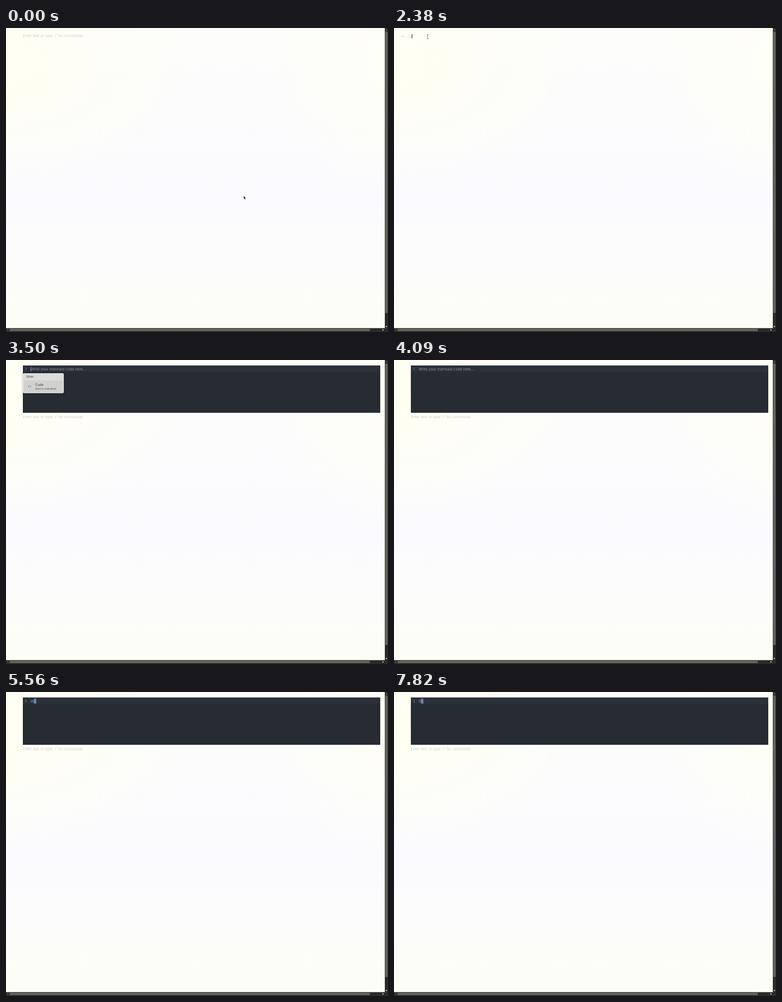
Recreate the animation shown at these times as an HTML page. Size 839 by 668 pixels, loop 8000 ms.

```html
<!DOCTYPE html>
<html lang="en">
<head>
<meta charset="utf-8">
<title>Editor</title>
<style>
html, body { margin: 0; width: 100%; height: 100%; overflow: hidden; }
body {
  position: relative;
  font: 8px Inter, sans-serif;
  background:
    radial-gradient(ellipse 420px 260px at 0 90px, #fffff2, #fffff200),
    radial-gradient(ellipse 260px 280px at 832px 90px, #fefff5, #fefff500),
    linear-gradient(#fdfdfb, #fcfcfd 25%, #fbfbff 56%, #fcfcfc 75%, #fdfdf6);
}
svg { position: absolute; left: 0; top: 0; }
#line {
  position: absolute; left: 54px; top: 13px;
  line-height: 14px; white-space: pre; color: #abb2bf;
}
.match { background: #bad0f847; padding: 1px 0; }
#bar {
  display: inline-block; width: 1px; height: 10px;
  margin: 0 -.5px; vertical-align: -2px; background: #7fa6f5;
}
</style>
</head>
<body>
<svg width="839" height="668">
  <g id="side" stroke="#c4c4c4" fill="#c4c4c4">
    <path d="M16 18.5h6M19 15.5v6" stroke-width=".7"/>
    <path d="M29.5 15.5h1m1.5 0h1m-3.5 3h1m1.5 0h1m-3.5 3h1m1.5 0h1"/>
  </g>
  <g id="block">
    <rect x="37" y="12" width="785" height="104" fill="#272c33"/>
    <rect x="37" y="12" width="785" height="14" fill="#2a3138"/>
    <text x="42" y="22.9" fill="#89909c">1</text>
  </g>
  <text id="hint" x="37" fill="#cfcfcf">Enter text or type '/' for commands</text>
  <text id="slash" x="37" y="21" fill="#3f3f3f">/</text>
  <rect id="caret" width="1" height="10" fill="#333"/>

  <g id="menu">
    <rect x="37" y="29" width="90" height="44" rx="3" fill="#fcfcf9"
      style="filter:drop-shadow(0 1px 3px #0004)"/>
    <rect x="39" y="45" width="86" height="27" rx="2" fill="#efefeb"/>
    <g fill="#555" font-weight="500">
      <text x="44.5" y="39.2" font-size="6">Other</text>
      <text x="64.5" y="56.5" font-size="7">Code</text>
      <text x="64.5" y="65.3" font-size="5">Insert a code block.</text>
    </g>
    <path d="M51 56l-2 2 2 2M53 56l2 2-2 2" fill="none" stroke="#555" stroke-width=".8"/>
  </g>

  <g fill="#2b2b2a">
    <path d="M832 0h7v668H0v-8.500h832z"/>
    <path d="M833 8h5v618h-5zM8 661h791v5H8z" fill="#66665f"/>
    <path d="M834 5l1.500-2.500 1.500 2.500zM5 662v3l-2.500-1.500z" fill="#888"/>
    <path d="M833.500 655h4l-2 2.500zM827 661.500v4l2.500-2z" fill="#eee"/>
  </g>
  <g id="size">
    <rect x="778" width="61" height="13" fill="#fdfdf9"/>
    <text x="782" y="9.3" font-size="6.8" font-family="Noto Sans, sans-serif" fill="#333">1675px × 1286px</text>
  </g>
  <path id="arrow" d="M0 0v7l1.600-1.500 1.200 2.700 1.300-.600-1.200-2.500h2.200z"
    fill="#000" stroke="#fff" stroke-width=".5"/>
  <path id="beam" d="M-2-4.500h1.500l.5.500.5-.5H2M0-4v8M-2 4.500h1.500l.5-.5.5.5H2"
    fill="none" stroke="#444" stroke-width=".8"/>
</svg>
<div id="line"></div>

<script>
const $ = id => document.getElementById(id);
const show = (id, on) => $(id).style.opacity = +on;
const ramp = (t, a, b) => Math.min(1, Math.max(0, (t - a) / (b - a)));
const ease = p => p * p * (3 - 2 * p);

// time, x, y of the mouse
const path = [[40, 522, 369], [820, 102, 58], [880, 102, 58], [1060, 94, 66], [1480, 74, 19]];
// time, typed code, colour of the word
const edits = [
  [3490, ""], [4670, "i", "#e06c75"], [4910, "id", "#e06c75"], [5560, "id()", "#61afef"],
  [5860, "id", "#e06c75"], [6170, "i", "#e06c75"], [6390, "if", "#c678dd"], [6590, "if()", "#c678dd"]
];

function mouseAt(t) {
  let [, x, y] = path[0];
  for (let i = 1; i < path.length; i++) {
    const [a, x0, y0] = path[i - 1], [b, x1, y1] = path[i];
    if (t < a) break;
    const p = ease(ramp(t, a, b));
    x = x0 + (x1 - x0) * p;
    y = y0 + (y1 - y0) * p;
  }
  return [x, y];
}

function codeAt(t) {
  const edit = edits.filter(e => e[0] <= t).pop();
  if (!edit) return "";
  const [start, text, color] = edit;
  const bar = (t - start) % 1200 < 600 ? '<i id="bar"></i>' : "";
  if (!text) return bar + '<span style="color:#8a9096">Write your mermaid code here...</span>';
  const word = `<span style="color:${color}">${text.replace("()", "")}</span>`;
  return text.endsWith("()")
    ? `${word}<span class="match">(</span>${bar}<span class="match">)</span>`
    : word + bar;
}

let lastCode = "";
function draw(t) {
  const coding = t >= 3470, typed = t >= 2380 && t < 3300, cleared = t >= 3300 && !coding;

  const [x, y] = mouseAt(t), overText = y < 27;
  for (const id of ["arrow", "beam"]) $(id).setAttribute("transform", `translate(${x} ${y})`);
  show("arrow", !overText);
  show("beam", overText && !coding);
  show("size", t >= 60 && t < 1080);
  show("side", t >= 1340 && t < 2430);

  show("hint", !typed);
  $("hint").setAttribute("y", coding ? 128 : cleared ? 24 : t < 40 ? 20.4 : 21);
  show("slash", typed);
  show("caret", t >= 1510 && t < 2010 || t >= 2380 && t < 2860 || cleared);
  $("caret").setAttribute("x", typed ? 39.5 : 37);
  $("caret").setAttribute("y", cleared ? 16 : 13);

  show("menu", ramp(t, 2420, 2700) * (1 - ramp(t, 3470, 3680)));
  show("block", coding);
  const code = codeAt(t);
  if (code !== lastCode) $("line").innerHTML = lastCode = code;
}

function tick() {
  draw(performance.now() % 8000);
  requestAnimationFrame(tick);
}
tick();
</script>
</body>
</html>
```
